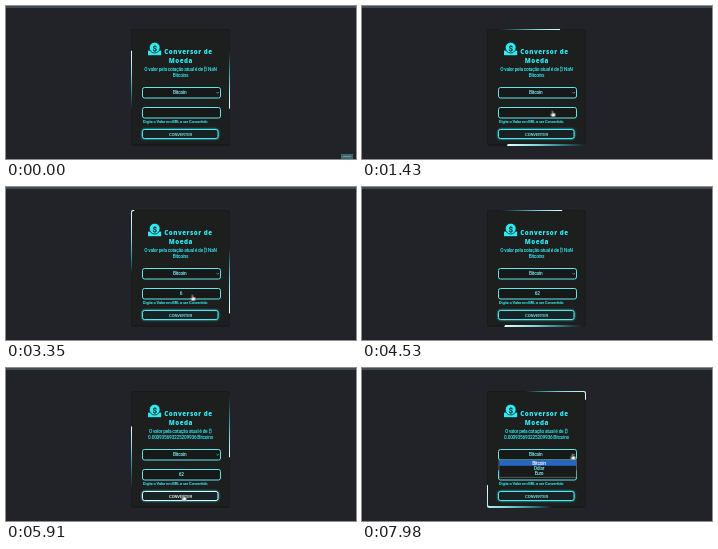
Animation, 350 px wide and 153 px high, one loop 8000 ms. Source, as an HTML page:

```html
<!DOCTYPE html>
<html lang="pt">
<head>
<meta charset="utf-8">
<title>Conversor de Moeda</title>
<style>
:root { --cyan: #2eeaf2; --soft: #7df0f4; --dark: #1d1f1e; }
html, body { margin: 0; width: 100%; height: 100%; overflow: hidden; background: #222329; }
.stage { position: absolute; left: 0; top: 0; width: 350px; height: 153px; overflow: hidden; }
.bar { position: absolute; width: 100%; height: 2px; background: #434c52; }

.card { position: absolute; left: 125px; top: 23px; width: 99px; height: 116.5px;
  border-radius: 2px; overflow: hidden; background: #191b1b; }
.glow { position: absolute; left: -50.5px; top: -49.5px; width: 200px; height: 200px;
  background: repeating-conic-gradient(#2ee3ec00 0 118deg, #4be6ec88 136deg, #8ff2f6dd 156deg, #e2ffff 180deg);
  animation: turn 8s linear infinite; }
.face { position: absolute; inset: 1.2px; border-radius: 1.5px; background: var(--dark); }

svg { position: absolute; left: 0; top: 0; }
text { font-family: Roboto, sans-serif; font-size: 4.8px; font-weight: 500; letter-spacing: -.24px; text-anchor: middle; fill: var(--cyan); }
.title { font: 800 6.2px "Open Sans", sans-serif; letter-spacing: .5px; }
.soft { fill: var(--soft); }
.hint { font-size: 4px; font-weight: 700; letter-spacing: -.14px; text-anchor: start; }
.field { fill: #171919; stroke: #62e6ea; stroke-width: 1; }
.button { fill: #182224; stroke: #4ceaf0; stroke-width: 1; filter: drop-shadow(0 0 1px #2ee3ec); }
.label { font-size: 4.2px; letter-spacing: -.08px; }

.before, .after, .one, .two, .menu, .tip, .hand, .arrow { animation: 8s step-end infinite; }
.before { animation-name: before; }
.after { animation-name: after; }
.one { animation-name: one; }
.two { animation-name: two; }
.menu { animation-name: menu; }
.tip { animation-name: tip; }
.hand { animation-name: hand; }
.arrow { animation-name: arrow; }
.cursor { animation: move 8s ease-in-out infinite; }
.hover .button { animation: edge 8s step-end infinite; }
.hover .label { animation: ink 8s step-end infinite; }

@keyframes turn { from { transform: rotate(-59.5deg); } to { transform: rotate(410.1deg); } }
@keyframes before { 0% { opacity: 1; } 72.5%, 100% { opacity: 0; } }
@keyframes after { 0% { opacity: 0; } 72.5%, 100% { opacity: 1; } }
@keyframes one { 0% { opacity: 0; } 41% { opacity: 1; } 46%, 100% { opacity: 0; } }
@keyframes two { 0% { opacity: 0; } 46%, 100% { opacity: 1; } }
@keyframes menu { 0% { opacity: 0; } 95%, 100% { opacity: 1; } }
@keyframes tip { 0% { opacity: 1; } .875%, 100% { opacity: 0; } }
@keyframes hand {
  0% { opacity: 0; } 10% { opacity: 1; } 44% { opacity: 0; }
  62% { opacity: 1; } 80% { opacity: 0; } 90%, 100% { opacity: 1; }
}
@keyframes arrow { 0% { opacity: 0; } 80% { opacity: 1; } 90%, 100% { opacity: 0; } }
@keyframes edge { 0% { stroke: #4ceaf0; } 67% { stroke: #d9ffff; } 78%, 100% { stroke: #4ceaf0; } }
@keyframes ink { 0% { fill: #7df0f4; } 67% { fill: #fff; } 78%, 100% { fill: #7df0f4; } }
@keyframes move {
  0%, 10% { transform: translate(206px, 118px); }
  16%, 24% { transform: translate(190.5px, 104.5px); }
  34%, 60% { transform: translate(186.5px, 107.5px); }
  69%, 76% { transform: translate(177.5px, 126.5px); }
  85.25% { transform: translate(202.5px, 79.5px); }
  92%, 100% { transform: translate(210.5px, 85.5px); }
}
</style>
</head>
<body>
<div class="stage">
  <div class="bar"></div>
  <div class="card"><div class="glow"></div><div class="face"></div></div>
  <svg width="350" height="153" viewBox="0 0 350 153">
    <g class="tip">
      <rect x="335" y="148" width="12" height="5" fill="#3d6970"/>
      <path d="M337 150.5h8" stroke="#81a5aa" stroke-width=".8"/>
    </g>

    <g fill="#2eeaf2">
      <path d="M142 44.6h13.2v4.6h-13.2z"/>
      <circle cx="148.7" cy="41.6" r="5.4" stroke="#1d1f1e" stroke-width=".8"/>
    </g>
    <text x="148.7" y="44.5" style="font-size:8px;font-weight:700;letter-spacing:0;fill:#1d1f1e">$</text>
    <text class="title" x="182.4" y="48.3">Conversor de</text>
    <text class="title" x="174.8" y="56.8">Moeda</text>

    <g class="before">
      <text x="174.5" y="65.3">O valor pela cotação atual é de ₿ NaN</text>
      <text x="174.5" y="70.8">Bitcoins</text>
    </g>
    <g class="after">
      <text x="174.3" y="65.3">O valor pela cotação atual é de ₿</text>
      <text x="174.5" y="70.8">0.000935693225209936 Bitcoins</text>
    </g>

    <rect class="field" x="136.5" y="81.5" width="78" height="10.5" rx="2"/>
    <text class="soft" x="173.7" y="88.4">Bitcoin</text>
    <path d="M210.6 86.2l1.1 1.1 1.1-1.1" fill="none" stroke="#7df0f4" stroke-width=".6"/>

    <rect class="field" x="136.5" y="101.5" width="78" height="10.5" rx="2"/>
    <text class="soft one" x="175" y="108.4">6</text>
    <text class="soft two" x="175.2" y="108.4">62</text>
    <text class="hint" x="137" y="117.1">Digite o Valor em BRL a ser Convertido</text>

    <g class="hover">
      <rect class="button" x="136.5" y="123.5" width="75.5" height="9" rx="2"/>
      <text class="label soft" x="174.5" y="129.5">CONVERTER</text>
    </g>

    <g class="menu">
      <rect x="137" y="92.2" width="77.3" height="17" fill="#191b1b" stroke="#8a9b9d" stroke-width=".5"/>
      <rect x="137.3" y="92.5" width="76.7" height="5.3" fill="#2467c4"/>
      <text x="177" y="96.6" style="fill:#fff">Bitcoin</text>
      <text class="soft" x="177" y="102">Dólar</text>
      <text class="soft" x="177" y="107.2">Euro</text>
    </g>

    <g class="cursor" fill="#fff" stroke="#111" stroke-width=".4">
      <path class="hand" d="M-.6 .4q.6-.8 1.2 0v2.2l2 .5q.6.2.5.9l-.5 2.3h-3.1l-1.9-2.4q.2-.8 1-.4l.8.6z"/>
      <path class="arrow" d="M0 0v4.8l1.1-1 .8 1.8.8-.4-.8-1.7h1.5z"/>
    </g>
  </svg>
</div>
</body>
</html>
```
